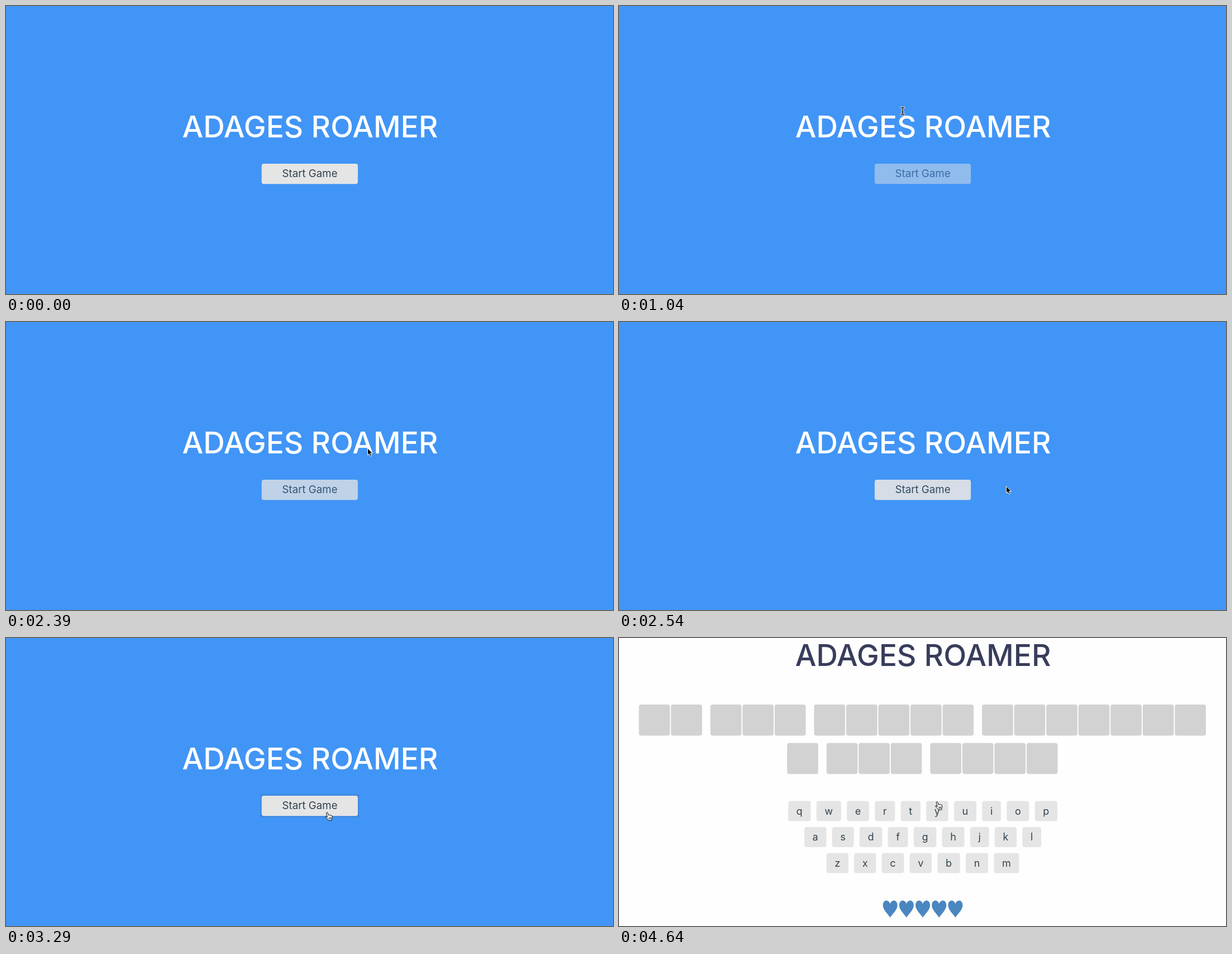
Write an HTML page that moves like this. It is 1087 px wide and 515 px high and loops after 8 s.

```html
<!DOCTYPE html>
<html lang="en">
<head>
<meta charset="utf-8">
<title>Word game</title>
<style>
  html, body { margin: 0; width: 100%; height: 100%; overflow: hidden; background: #fefefe; }
  svg { display: block; width: 100%; height: 100%; }
  text { font-family: Inter, "Open Sans", sans-serif; font-size: 18px; text-anchor: middle; fill: #32434f; }
  #title { font-size: 53.4px; font-weight: 500; }
  #button text { font-size: 18.7px; }
</style>
</head>
<body>
<svg viewBox="0 0 1087 515">
  <g id="start">
    <rect width="1087" height="515" fill="#4195f6"/>
    <rect id="focus" x="455.7" y="279.7" width="176.6" height="41" fill="#3d86dd"/>
    <g id="button">
      <rect x="457.8" y="282" width="172.3" height="36.2" rx="4" fill="#e5e5e5"/>
      <text x="544" y="306.4">Start Game</text>
    </g>
  </g>
  <g id="game">
    <rect width="1087" height="515" fill="#fefefe"/>
    <g id="tiles" fill="#d2d2d2"></g>
    <g id="keys" fill="#e5e5e5"></g>
    <g id="hearts" fill="#4a86c0"></g>
  </g>
  <text id="title" x="544.5">ADAGES ROAMER</text>
  <g id="arrow">
    <path d="M.5 .8V13L3.3 10.6L5.3 15L7.6 14L5.7 9.7H9.4Z" fill="#000" stroke="#fff" stroke-linejoin="round"/>
  </g>
  <g id="beam" fill="none" stroke-linecap="square">
    <path id="bar" d="M1.5 1.5Q4.3 1.5 4.3 3.5Q4.3 1.5 7 1.5M4.3 3V12.5M1.5 14Q4.3 14 4.3 12Q4.3 14 7 14M3 9.5H5.6" stroke="#fff" stroke-width="2.8"/>
    <use href="#bar"/>
  </g>
  <g id="hand" stroke="#000" stroke-linejoin="round" stroke-linecap="round">
    <path d="M4.4 9.4L2.8 3Q2.5 1 3.8 .8Q5.1 .7 5.5 2.5L6.4 6Q7.5 4.8 8.7 6Q9.9 5 11 6.3Q13 6 13.2 8.2Q13.4 11 12.2 12.8L12 15.2H6.4Q5.5 13 3 11Q.4 9 1.2 8.2Q2.2 7.5 4.4 9.4Z" fill="#fff"/>
    <path d="M7.4 10V13M9.1 9.8V13M10.8 9.6V12.8" stroke-width=".8"/>
  </g>
</svg>
<script>
const LOOP = 8000, FOCUS_AT = 3290, GAME_AT = 3440;
const $ = id => document.getElementById(id);

function add(parent, tag, attrs, text = "") {
  const el = document.createElementNS($("start").namespaceURI, tag);
  for (const name in attrs) el.setAttribute(name, attrs[name]);
  el.textContent = text;
  parent.append(el);
  return el;
}

// Dark core of the text cursor, over its white outline
const core = $("beam").querySelector("use");
core.replaceWith(add($("beam"), "path", { d: $("bar").getAttribute("d"), stroke: "#111", "stroke-width": 1.3 }));

// One box per letter, each line of words centred
const PITCH = 57.55, BOX = 55.6, SPACE = 13;
["-- --- ----- -------", "- --- ----"].forEach((line, row) => {
  const step = c => c === " " ? SPACE : PITCH;
  const total = [...line].reduce((sum, c) => sum + step(c), BOX - PITCH);
  let x = 543.3 - total / 2;
  for (const c of line) {
    if (c !== " ") add($("tiles"), "rect", { x, y: 119 + row * 68.7, width: BOX, height: BOX, rx: 4 });
    x += step(c);
  }
});

// Each key is as wide as its letter plus padding
const PAD = 29.35, GAP = 10.3;
["qwertyuiop", "asdfghjkl", "zxcvbnm"].forEach((letters, row) => {
  const y = 291.5 + row * 46.5;
  const keys = [...letters].map(letter => {
    const key = add($("keys"), "rect", { y, height: 36, rx: 4 });
    const label = add($("keys"), "text", { y: y + 24.4 }, letter);
    return { key, label, width: label.getComputedTextLength() + PAD };
  });
  const total = keys.reduce((sum, k) => sum + k.width + GAP, -GAP);
  let x = 544 - total / 2;
  for (const { key, label, width } of keys) {
    key.setAttribute("x", x);
    key.setAttribute("width", width);
    label.setAttribute("x", x + width / 2);
    x += width + GAP;
  }
});

const heart = "M0 30.5C-3 25-13 17-13 8.5C-13 3-10 0-7 0C-3.5 0-1 2.5 0 6C1 2.5 3.5 0 7 0C10 0 13 3 13 8.5C13 17 3 25 0 30.5Z";
for (let i = -2; i <= 2; i++)
  add($("hearts"), "path", { d: heart, transform: `translate(${544 + i * 29.2} 469.5)` });

// Pointer stops: time, shape, position
const stops = [
  [0, "", 0, 0], [890, "arrow", 143, 27], [1040, "beam", 503.5, 180],
  [2390, "arrow", 647, 225], [2540, "arrow", 693, 293], [2690, "arrow", 628, 319],
  [2840, "hand", 578, 313], [2990, "hand", 571, 311], [4640, "hand", 565.5, 292]
];
const show = (id, on) => $(id).setAttribute("visibility", on ? "visible" : "hidden");

// Number of ticks passed since a start time, at most three
const ticks = (t, from, gap) => Math.max(0, Math.min(3, 1 + Math.floor((t - from) / gap)));

function buttonOpacity(t) {
  const down = ticks(t, 600, 145);
  const up = (t >= 2090) + ticks(t, 2390, 150);
  return Math.min(1, 1 - .173 * down + .143 * up);
}

function draw(t) {
  const playing = t >= GAME_AT;
  show("start", !playing);
  show("game", playing);
  show("focus", !playing && t >= FOCUS_AT);
  $("button").setAttribute("opacity", buttonOpacity(t));
  $("title").setAttribute("y", playing ? 50 : 235);
  $("title").style.fill = playing ? "#383d5c" : "#fff";

  const [, shape, x, y] = stops.findLast(stop => stop[0] <= t);
  for (const id of ["arrow", "beam", "hand"]) {
    show(id, id === shape);
    $(id).setAttribute("transform", `translate(${x} ${y})`);
  }
}

const began = performance.now();
function tick() {
  draw((performance.now() - began) % LOOP);
  requestAnimationFrame(tick);
}
tick();
</script>
</body>
</html>
```
